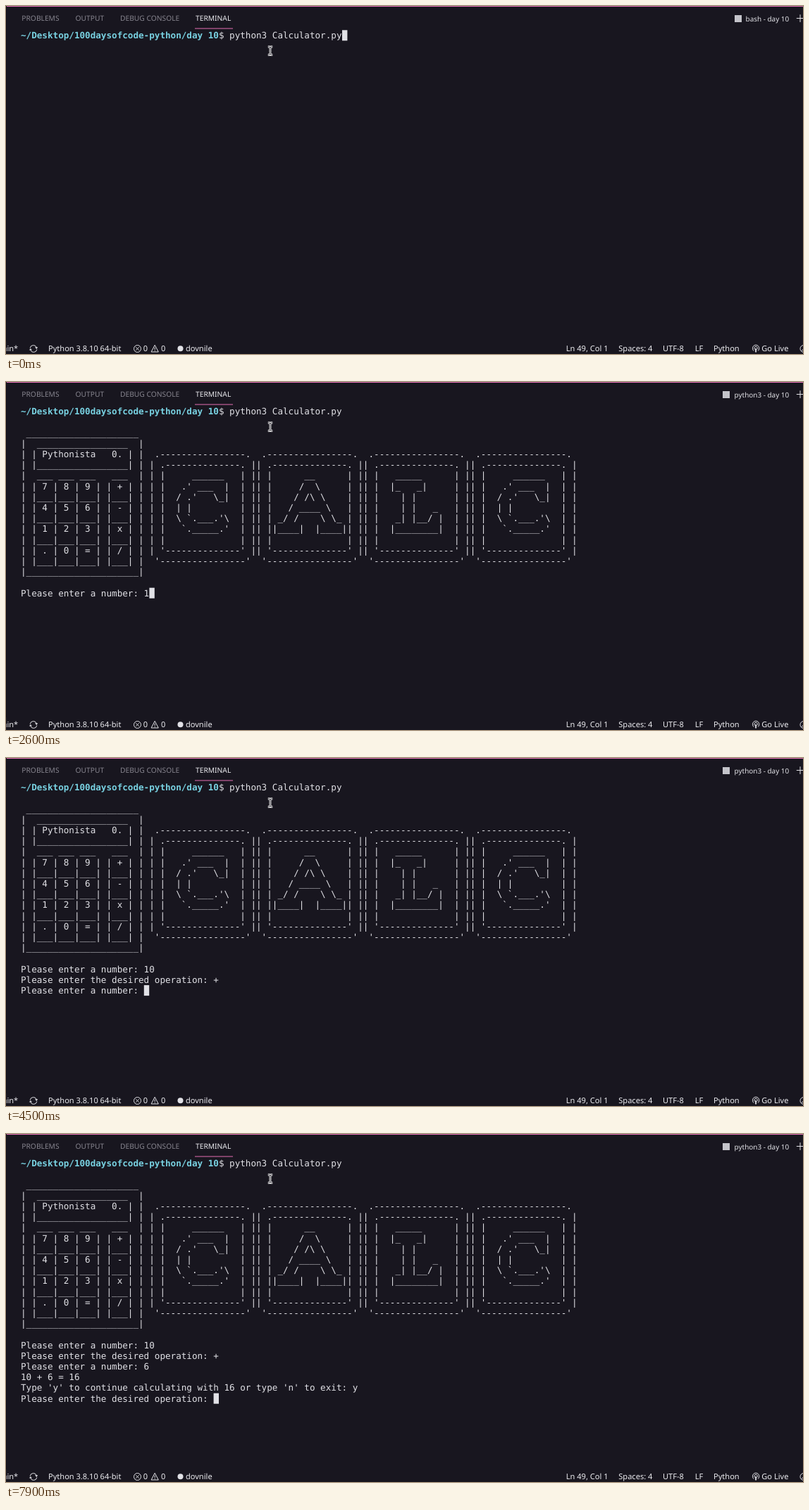
Animation of 1131x495 px, one loop 8000 ms. Source, as an HTML page:

```html
<!DOCTYPE html>
<html lang="en">
<head>
<meta charset="utf-8">
<title>Terminal calculator</title>
<style>
  html, body { margin: 0; width: 100%; height: 100%; overflow: hidden; background: #18161f; }
  svg { display: block; width: 1131px; height: 495px; }
  text { text-rendering: geometricPrecision; white-space: pre; }
  .mono { font: 12.624px "DejaVu Sans Mono", monospace; fill: #e1e1e6; }
  .path { font-weight: bold; fill: #78d1e1; }
  .tab { font: 10.25px "Noto Sans", "Open Sans", sans-serif; fill: #86848e; }
  .on { fill: #ececf0; }
  .title { font: 9.95px "Noto Sans", "Open Sans", sans-serif; fill: #e1e1e6; }
  .status { font: 11.05px "Noto Sans", "Open Sans", sans-serif; fill: #ececf0; }
  .icon { fill: none; stroke: #e1e1e6; stroke-width: 1; }
</style>
</head>
<body>
<svg viewBox="0 0 1131 495" xmlns="http://www.w3.org/2000/svg">
  <rect width="1131" height="495" fill="#18161f"/>
  <rect y="1" width="1" height="476" fill="#100e17"/>
  <rect x="1" width="1130" height="1" fill="#e46fb4"/>

  <g id="tabs"></g>
  <rect x="268" y="31.5" width="54" height="1" fill="#e46fb4"/>

  <rect id="shell" y="13" width="10" height="10" fill="#c4c4ca"/>
  <text id="title" class="title" x="1111.2" y="21.6" text-anchor="end"></text>
  <path class="icon" d="M1121.8 17.5H1132M1127 12.2V23"/>

  <g id="screen"></g>
  <rect id="cursor" width="7.4" height="15" fill="#e1e1e6"/>

  <g fill="none">
    <path d="M371.8 58h2.1l1.1 1 1.1-1h2.1M375 59V68.5M371.8 69.5h2.1l1.1-1 1.1 1h2.1" stroke="#fff" stroke-width="2.8"/>
    <path d="M371.8 58h2.1l1.1 1 1.1-1h2.1M375 59V68.5M371.8 69.5h2.1l1.1-1 1.1 1h2.1" stroke="#18161f" stroke-width="0.9"/>
  </g>

  <g id="status"></g>
  <g class="icon">
    <path d="M34.2 486.5a4.7 4.7 0 0 1 9-1M43.8 488.5a4.7 4.7 0 0 1-9 1"/>
    <path d="M41 485.3h4.2l-1.9 2.6zM32.8 489.6h4.2l-2.1-2.7z" fill="#e1e1e6" stroke="none"/>
    <circle cx="186.5" cy="487.5" r="5"/>
    <path d="M184.4 485.4l4.2 4.2M188.6 485.4l-4.2 4.2"/>
    <path d="M211.2 482.3L216.3 492H206.1zM211.2 485.7v3.2M211.2 489.8v1.1"/>
    <circle cx="247.5" cy="487.3" r="4" fill="#e1e1e6" stroke="none"/>
    <path d="M1061.2 490.6a4.7 4.7 0 1 1 5.8 0M1062.4 488.5a2.4 2.4 0 1 1 3.4 0"/>
    <path d="M1064.1 487v5.6" stroke-width="1.8"/>
    <circle cx="1132" cy="487.5" r="5"/>
    <path d="M1128.5 491l7-7"/>
  </g>
</svg>
<script>
const COL = 7.6, ROW = 15.2, LEFT = 21, TOP = 34.3, BASE = 46.1, LOOP = 8000;
const $ = id => document.getElementById(id);

function addText(parent, x, y, cls, str) {
  const t = document.createElementNS("http://www.w3.org/2000/svg", "text");
  t.setAttribute("x", x);
  t.setAttribute("y", y);
  t.setAttribute("class", cls);
  t.textContent = str.replace(/ /g, "\u00a0");
  parent.appendChild(t);
  return t;
}

[["PROBLEMS", 22.3], ["OUTPUT", 98.6], ["DEBUG CONSOLE", 162], ["TERMINAL", 269]].forEach(([s, x], i) =>
  addText($("tabs"), x, 20.8, i === 3 ? "tab on" : "tab", s));

addText($("status"), 17.2, 491.2, "status", "main*").setAttribute("text-anchor", "end");
[["Python 3.8.10 64-bit", 60], ["0", 194.8], ["0", 220], ["dovnile", 255],
 ["Ln 49, Col 1", 794.8], ["Spaces: 4", 869.3], ["UTF-8", 932], ["LF", 977.8],
 ["Python", 1004], ["Go Live", 1072.3]].forEach(([s, x]) => addText($("status"), x, 491.2, "status", s));

// Calculator keypad
const line = n => "_".repeat(n);
const keys = (a, b, c, op) => [`| | ${a} | ${b} | ${c} | | ${op} | |`, "| |___|___|___| |___| |"];
const pad = [
  " " + line(21) + " ",
  "|  " + line(17) + "  |",
  "| | Pythonista   0. | |",
  "| |" + line(17) + "| |",
  "|  ___ ___ ___   ___  |",
  ...keys(7, 8, 9, "+"), ...keys(4, 5, 6, "-"), ...keys(1, 2, 3, "x"), ...keys(".", 0, "=", "/"),
  "|" + line(21) + "|"
];

// Letter cards, each glyph 14 columns wide
const C = ["     ______", "   .' ___  |", "  / .'   \\_|", "  | |", "  \\ `.___.'\\", "   `._____.'", ""];
const A = ["      __", "     /  \\", "    / /\\ \\", "   / ____ \\", " _/ /    \\ \\_", "|____|  |____|", ""];
const L = ["   _____", "  |_   _|", "    | |", "    | |   _", "   _| |__/ |", "  |________|", ""];
const card = glyph => [
  " ." + "-".repeat(16) + ". ",
  "| ." + "-".repeat(14) + ". |",
  ...glyph.map(s => "| |" + s.padEnd(14) + "| |"),
  "| '" + "-".repeat(14) + "' |",
  " '" + "-".repeat(16) + "' "
];
const cards = [C, A, L, C].map(card);
const banner = pad.map((s, i) => {
  const r = i - 2;
  return r >= 0 && r < 11 ? s + " " + cards.map(c => c[r]).join("") : s;
});

const dir = "~/Desktop/100daysofcode-python/day 10";
const command = " ".repeat(dir.length) + "$ python3 Calculator.py";
const askNum = "Please enter a number: ";
const askOp = "Please enter the desired operation: ";

// Terminal output by time; the cursor follows the last character
const output = [
  [0, command],
  [700, "\n"],
  [900, "\n" + banner.join("\n") + "\n\n" + askNum],
  [2600, "1"],
  [2800, "0"],
  [3300, "\n" + askOp],
  [4400, "+"],
  [4500, "\n" + askNum],
  [5800, "6"],
  [6100, "\n10 + 6 = 16\nType 'y' to continue calculating with 16 or type 'n' to exit: "],
  [7900, "y\n" + askOp]
];

let shown = -1;
function render(t) {
  const step = output.filter(([at]) => at <= t).length;
  if (step === shown) return;
  shown = step;
  const rows = output.slice(0, step).map(o => o[1]).join("").split("\n");
  const screen = $("screen");
  screen.textContent = "";
  addText(screen, LEFT, BASE, "mono path", dir);
  rows.forEach((s, r) => s && addText(screen, LEFT, BASE + r * ROW, "mono", s));
  const last = rows.length - 1;
  $("cursor").setAttribute("x", LEFT + rows[last].length * COL);
  $("cursor").setAttribute("y", TOP + last * ROW);
  const running = t >= 900;
  $("title").textContent = running ? "python3 - day 10" : "bash - day 10";
  $("shell").setAttribute("x", running ? 1017 : 1034);
}

const start = performance.now();
function frame() {
  render((performance.now() - start) % LOOP);
  requestAnimationFrame(frame);
}
render(0);
requestAnimationFrame(frame);
</script>
</body>
</html>
```
